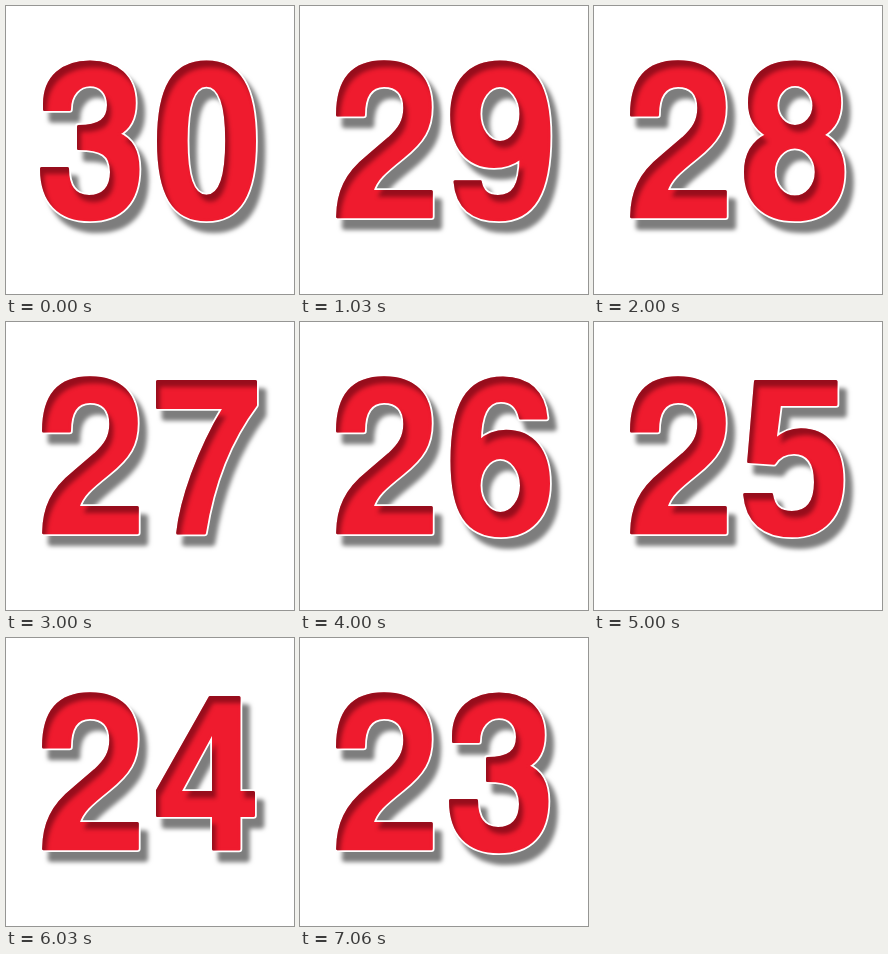
Write an HTML page that moves like this. It is 288 px wide and 288 px high and loops after 8000 ms.

```html
<!DOCTYPE html>
<html lang="en">
<head>
<meta charset="utf-8">
<title>Countdown</title>
<style>
  html, body { margin: 0; width: 100%; height: 100%; overflow: hidden; background: #fff; }
  svg { display: block; width: 100vw; height: 100vh; }
  path { stroke-linejoin: round; }
  .rim { fill: #fff; stroke: #fff; stroke-width: 6.6; }
  .face { fill: #ef1b2e; stroke: #ef1b2e; stroke-width: 3; }
</style>
</head>
<body>
<svg viewBox="0 0 288 288">
  <defs>
    <filter id="drop" filterUnits="userSpaceOnUse" x="0" y="0" width="420" height="288" color-interpolation-filters="sRGB">
      <feDropShadow dx="7.5" dy="10" stdDeviation="1.9" flood-color="#000" flood-opacity=".51"/>
    </filter>
    <filter id="inset" filterUnits="userSpaceOnUse" x="0" y="0" width="420" height="288" color-interpolation-filters="sRGB">
      <feFlood flood-color="#40000a" flood-opacity=".5"/>
      <feComposite operator="out" in2="SourceAlpha"/>
      <feOffset dx="3.5" dy="6.5"/>
      <feGaussianBlur stdDeviation="2.2"/>
      <feComposite operator="in" in2="SourceAlpha" result="shade"/>
      <feMerge><feMergeNode in="SourceGraphic"/><feMergeNode in="shade"/></feMerge>
    </filter>
  </defs>
  <g class="digit" transform="translate(-115 0)">
    <path class="rim" filter="url(#drop)"/><path class="face" filter="url(#inset)"/>
  </g>
  <g class="digit">
    <path class="rim" filter="url(#drop)"/><path class="face" filter="url(#inset)"/>
  </g>
</svg>
<script>
// Closed oval counter, wound against the outer contour
const oval = (x, y, rx, ry, k = .55) => {
  const a = rx * k, b = ry * k;
  return `M${x} ${y - ry}C${x - a} ${y - ry} ${x - rx} ${y - b} ${x - rx} ${y}` +
    `S${x - a} ${y + ry} ${x} ${y + ry}S${x + rx} ${y + b} ${x + rx} ${y}S${x + a} ${y - ry} ${x} ${y - ry}Z`;
};

// Outlines are inset by half the face stroke, which rounds the corners
const glyphs = {
  0: 'M200.5 55.9C233 55.9 248.5 81 248.5 135S233 213.8 200.5 213.8S152.5 189 152.5 135S168 55.9 200.5 55.9Z' + oval(200.4, 134.7, 20.3, 55.5, .68),
  2: 'M152.5 109C152.5 74 168 55.7 199 55.7S245.3 73 245.3 101.5C245.3 122 238 135 217 151.5C199 166 190 173.5 187 185.5H246.3V210.8H152.6C153 186 161 168 183 150.5L204 132.5C215 122.5 219.8 114.5 219.8 102C219.8 87 212 79.5 199 79.5S178.5 89.5 178.5 109Z',
  3: 'M153.5 103.5V98C153.5 71 172 55.9 199 55.9S243.3 71 243.3 97C243.3 112 238.5 122 227 128C240 133.5 247 145.5 247 163C247 196 229.5 213.8 199 213.8S150.5 196 150.5 162.5H176.5C176.5 181.5 184 190.5 198 190.5S220.5 182 220.5 166C220.5 148 211 142.5 187.5 142.5V120.5C209 120.5 217.5 113.5 217.5 99C217.5 86.5 210 78.7 199 78.7S178.5 88 178.5 103.5Z',
  4: 'M204 59.5H233V154.5H247.5V177.5H233V211H207.5V177.5H151.5V152.5ZM207.5 92L173.5 154.5H207.5Z',
  5: 'M161.5 59.5H242V82.5H185.5L181 118C189 111 198 107.7 207 107.7C233 107.7 248 127 248 158C248 194 229 213.8 198 213.8C169.5 213.8 153 199 150.7 172.5H177.5C179.5 185.5 186 190.5 198 190.5C213.5 190.5 221.5 180 221.5 160S213.5 130.5 200 130.5C191 130.5 184.5 134 180 141.3L154.7 139.5Z',
  6: 'M246 96H220.5C218 84 211.5 78.5 201 78.5C187 78.5 179.5 91 179.5 119.5C187 112.5 196 109.3 206 109.3C233 109.3 248.5 129 248.5 161.5C248.5 194 230 213.8 201 213.8C167 213.8 152 190 152 139C152 83 167 55.9 203 55.9C228 55.9 244 70 246 96Z' + oval(200.3, 163.5, 21.2, 28),
  7: 'M151.5 59.5H249.5V83C221 121 206 163 198.5 211H171.7C175 179 192 129 218.5 85.5H151.5Z',
  8: 'M201 55.9C231 55.9 245.7 71 245.7 97C245.7 112 240 122 228.5 129C242 136 249 148 249 166C249 196 231.5 213.8 201 213.8S151.5 196 151.5 166C151.5 148 159 136 173 129C162 122 155.5 112 155.5 97C155.5 71 171 55.9 201 55.9Z' + oval(201, 99.5, 19, 21) + oval(200.8, 166, 21.5, 25),
  9: 'M155 175.7H180.3C182 186 188 190.5 198 190.5C213 190.5 221 180 221 151.5C213 157.5 204 160.5 194 160.5C167 160.5 151.7 140 151.7 109C151.7 75 170 55.9 200 55.9C234.5 55.9 249 81 249 130C249 187 233 213.8 199 213.8C172.5 213.8 157 201 155 175.7Z' + oval(200, 108, 21, 28.5)
};

const starts = [0, 1030, 2000, 3000, 4000, 5000, 6030, 7060];
const digits = document.querySelectorAll('.digit');
const origin = performance.now();
let shown;

function draw() {
  const t = (performance.now() - origin) % 8000;
  const count = 31 - starts.filter(s => s <= t).length;
  if (count !== shown) {
    shown = count;
    digits.forEach((g, i) => {
      for (const path of g.children) path.setAttribute('d', glyphs[String(count)[i]]);
    });
  }
  requestAnimationFrame(draw);
}
draw();
</script>
</body>
</html>
```
